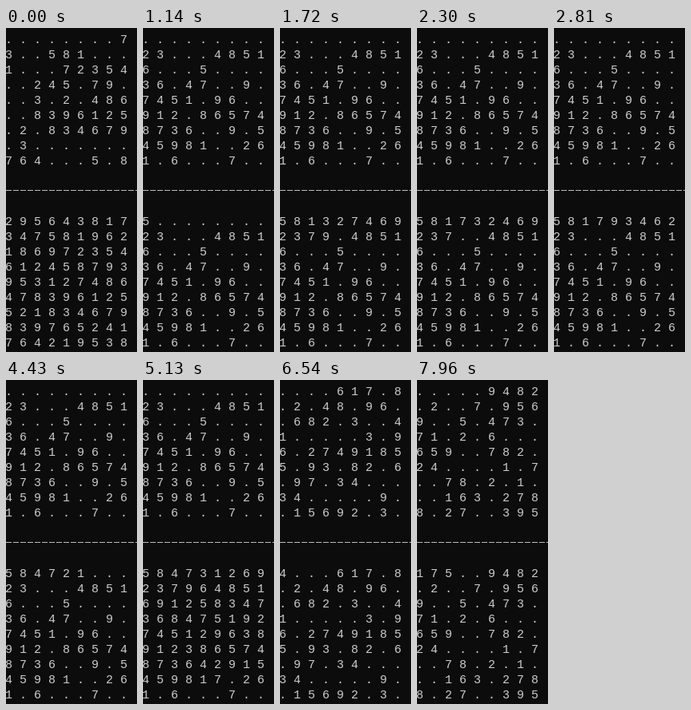
An HTML page with a canvas for the animation above (7990 ms loop, 164 by 406 pixels).

```html
<!DOCTYPE html>
<html>
<head>
<meta charset="utf-8">
<style>
  html, body { margin: 0; height: 100%; overflow: hidden; background: #0c0c0c; }
  canvas { display: block; }
</style>
</head>
<body>
<canvas id="screen" width="164" height="406"></canvas>
<script>
const LOOP = 7990;
const ROW = 19;
const ctx = document.getElementById('screen').getContext('2d');

// marks: [time in ms, digits placed so far (null = solved), hold in ms]
const scenes = [
  {
    puzzle: `........7 3..581... 1...72354 ..245.79. ..3.2.486
             ..8396125 .2.834679 .3....... 764...5.8`,
    marks: [[0, null, 0]],
  },
  {
    puzzle: `......... 23...4851 6...5.... 36.47..9. 7451.96..
             912.86574 8736..9.5 45981..26 1.6...7..`,
    marks: [
      [1120, '', 0],
      [1720, '58132746979', 20],
      [2810, '581793462', 40],
      [3580, '5819672', 100],
      [5130, '584731269' + '796' + '9128347' + '8512' + '238' + '3' + '421' + '7', 20],
      [5520, null, 0],
    ],
  },
  {
    puzzle: `....617.8 .2.48.96. .682.3..4 1.....3.9 6.2749185
             5.93.82.6 .97.34... 34.....9. .15692.3.`,
    marks: [[6540, '4', 20], [7170, null, 0]],
  },
  {
    puzzle: `.....9482 .2..7.956 9..5.473. 71.2.6... 659..782.
             24....1.7 ..78.2.1. ..163.278 8.27..395`,
    marks: [[7840, '', 0], [7960, '175', 30]],
  },
];

function fits(cells, pos, digit) {
  const row = Math.floor(pos / 9), col = pos % 9;
  const boxRow = row - row % 3, boxCol = col - col % 3;
  for (let i = 0; i < 9; i++) {
    const inBox = (boxRow + Math.floor(i / 3)) * 9 + boxCol + i % 3;
    if ([row * 9 + i, i * 9 + col, inBox].some(p => cells[p] === digit)) return false;
  }
  return true;
}

// Plain backtracking; records the board after every placed digit.
function solve(cells, steps, placed = '') {
  steps.push({ placed, board: cells.join('') });
  const pos = cells.indexOf('.');
  if (pos < 0) return true;
  for (const digit of '123456789') {
    if (!fits(cells, pos, digit)) continue;
    cells[pos] = digit;
    if (solve(cells, steps, placed + digit)) return true;
    cells[pos] = '.';
  }
  return false;
}

for (const scene of scenes) {
  scene.puzzle = scene.puzzle.replace(/\s/g, '');
  scene.steps = [];
  solve([...scene.puzzle], scene.steps);
  scene.marks = scene.marks.map(([time, placed, hold]) => ({
    time,
    hold,
    index: placed === null
      ? scene.steps.length - 1
      : scene.steps.findIndex(step => step.placed === placed),
  }));
}

function stepAt(marks, t) {
  const next = marks.findIndex(mark => mark.time > t);
  const from = marks.at(next < 0 ? -1 : next - 1);
  const start = from.time + from.hold;
  if (next < 0 || t < start) return from.index;
  const to = marks[next];
  const first = from.hold ? from.index + 1 : from.index;
  const progress = (t - start) / (to.time - start);
  return Math.floor(first + (to.index - first) * progress);
}

function drawBoard(board, line) {
  for (let r = 0; r < 9; r++) {
    const text = [...board.slice(r * 9, r * 9 + 9)].join(' ');
    ctx.fillText(text, -1, ROW * (line + r + 1));
  }
}

function draw() {
  const t = performance.now() % LOOP;
  const scene = scenes.findLast(s => s.marks[0].time <= t);

  ctx.fillStyle = '#0c0c0c';
  ctx.fillRect(0, 0, 164, 406);
  ctx.fillStyle = '#ccc';
  ctx.font = '15px "Liberation Mono", monospace';
  drawBoard(scene.puzzle, 0);
  drawBoard(scene.steps[stepAt(scene.marks, t)].board, 12);

  ctx.strokeStyle = '#bbb';
  ctx.setLineDash([7, 2]);
  ctx.beginPath();
  ctx.moveTo(0, 203.5);
  ctx.lineTo(164, 203.5);
  ctx.stroke();

  requestAnimationFrame(draw);
}
draw();
</script>
</body>
</html>
```
